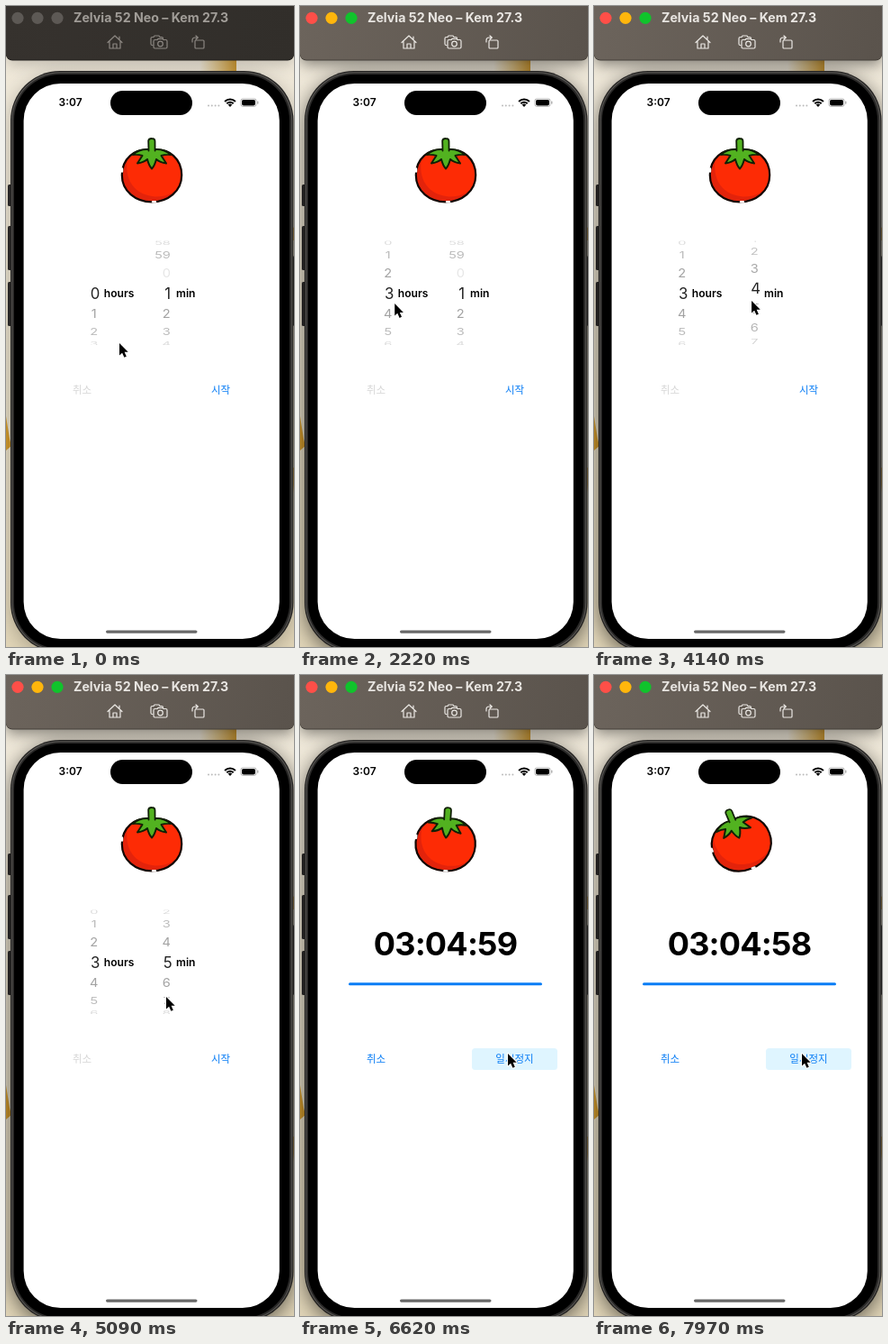
Write an HTML page with a canvas that moves like this. It is 320 px wide and 711 px high and loops after 7990 ms.

```html
<!DOCTYPE html>
<html lang="ko">
<head>
<meta charset="utf-8">
<title>Timer</title>
<style>
  html, body { margin: 0; width: 100%; height: 100%; overflow: hidden; background: #ddd5c4; }
  canvas { display: block; width: 320px; height: 711px; }
</style>
</head>
<body>
<canvas></canvas>
<script>
const LOOP = 7990, ACTIVATE = 920, START = 6110, TIMER_SHOWN = 6170, TICK = 7130;
const BLUE = '#0a7df5';
const LATIN = 'Inter, sans-serif', KOREAN = '"Noto Sans CJK KR", "Noto Sans CJK", sans-serif';

const canvas = document.querySelector('canvas');
const ctx = canvas.getContext('2d');
const ratio = window.devicePixelRatio || 1;
canvas.width = 320 * ratio;
canvas.height = 711 * ratio;

const clamp = v => Math.max(0, Math.min(1, v));
const progress = (t, from, to) => clamp((t - from) / (to - from));
const easeOut = p => 1 - (1 - p) ** 3;
const smooth = p => p * p * (3 - 2 * p);

// Value at time t of a list of [time, value] keys, eased between keys.
function track(t, keys) {
  let value = keys[0][1];
  for (let i = 1; i < keys.length; i++) {
    const [t0, v0] = keys[i - 1], [t1, v1] = keys[i];
    if (t >= t0) value = v0 + (v1 - v0) * smooth(progress(t, t0, t1));
  }
  return value;
}

function box(x, y, w, h, radius, fill) {
  ctx.beginPath();
  ctx.roundRect(x, y, w, h, radius);
  ctx.fillStyle = fill;
  ctx.fill();
}

function shadowed(blur, opacity, draw) {
  ctx.save();
  ctx.shadowColor = `rgba(0,0,0,${opacity})`;
  ctx.shadowBlur = blur * ratio;
  ctx.shadowOffsetY = 5 * ratio;
  draw();
  ctx.restore();
}

function disc(x, y, r, fill) {
  ctx.beginPath();
  ctx.arc(x, y, r, 0, Math.PI * 2);
  ctx.fillStyle = fill;
  ctx.fill();
}

function shape(d, fill, stroke, width) {
  const path = new Path2D(d);
  if (fill) { ctx.fillStyle = fill; ctx.fill(path); }
  if (stroke) { ctx.strokeStyle = stroke; ctx.lineWidth = width; ctx.stroke(path); }
}

function text(str, x, centerY, size, color, { weight = 400, align = 'left', family = LATIN } = {}) {
  ctx.font = `${weight} ${size}px ${family}`;
  ctx.textAlign = align;
  ctx.fillStyle = color;
  ctx.fillText(str, x, centerY + size * 0.36);
}

function clipped(x, y, w, h, draw) {
  ctx.save();
  ctx.beginPath();
  ctx.rect(x, y, w, h);
  ctx.clip();
  draw();
  ctx.restore();
}

function drawDesktop() {
  const wall = ctx.createLinearGradient(0, 60, 0, 711);
  wall.addColorStop(0, '#f1eadb');
  wall.addColorStop(0.5, '#e6dec9');
  wall.addColorStop(1, '#e2d6b8');
  ctx.fillStyle = wall;
  ctx.fillRect(0, 0, 320, 711);
  const gold = ctx.createLinearGradient(215, 0, 256, 0);
  gold.addColorStop(0, 'rgba(214,170,70,0)');
  gold.addColorStop(1, '#c9952f');
  ctx.fillStyle = gold;
  ctx.fillRect(215, 60, 41, 13);
  shape('M0 455L4 480L6 488L0 493Z', '#d29a2c');
  shape('M317 244L320 246V260H317ZM317 512H320V540Z', '#dcae58');
}

function drawToolbar(active) {
  const bar = ctx.createLinearGradient(0, 0, 320, 60);
  bar.addColorStop(0, active ? '#6c645c' : '#36322e');
  bar.addColorStop(1, active ? '#5a534c' : '#312e2a');
  box(0, -10, 320, 70.5, 7, active ? '#45403a' : '#211f1c');
  box(0, -10, 320, 69.5, 7, bar);
  const lights = active ? ['#ff4f48', '#ffb60c', '#10c32c'] : ['#5d5955', '#5d5955', '#5d5955'];
  lights.forEach((color, i) => disc(13 + 22 * i, 13.3, 6.6, color));
  text('Zelvia 52 Neo – Kem 27.3', 75, 13, 14.2, active ? '#e9e6e2' : '#a19d98', { weight: 700 });

  const ink = active ? '#ebe8e4' : '#8c8782';
  ctx.lineJoin = ctx.lineCap = 'round';
  shape('M113 40.500L121 33L129 40.500M115 39.500V47H127V39.500M119 47V42H123V47M126 34V36.500', null, ink, 1.2);
  shape('M163 43.500H162.500Q161 43.500 161 42V36Q161 34.500 162.500 34.500H164L165 33H170L171 34.500H173Q174.500 34.500 174.500 36', null, ink, 1.2);
  shape('M165.500 37.500H168L169 36.300H174L175 37.500H177.500Q179 37.500 179 39V45.500Q179 47 177.500 47H165.500Q164 47 164 45.500V39Q164 37.500 165.500 37.500ZM174.300 42A2.800 2.800 0 1 1 168.700 42A2.800 2.800 0 1 1 174.300 42Z', null, ink, 1.2);
  shape('M211 38H219Q220 38 220 39V46Q220 47 219 47H211Q210 47 210 46V39Q210 38 211 38ZM207 40V38Q207 35 210 35H213M211 33L213.300 35L211 37', null, ink, 1.2);
}

function drawPhone(active) {
  for (const [y, h] of [[198, 24], [244, 49], [306, 49]]) box(2, y, 6, h, 1.5, '#2d2b2a');
  box(315, 277, 5, 78, 1.5, '#2d2b2a');
  shadowed(22, active ? 0.55 : 0.25, () => box(5, 72, 314.5, 645, 55, '#232221'));
  box(6.2, 73.2, 312, 642.5, 54, '#5b5956');
  box(7.2, 74.2, 310, 640.5, 53, '#2b2a29');
  box(9, 76, 306, 637, 51, '#000');
  box(19.6, 86, 284.2, 616, 41, '#fff');
  box(116, 94, 91, 27, 13.5, '#000');
  box(111, 692.5, 101.5, 3.2, 1.6, '#686868');

  text('3:07', 58.5, 107, 12, '#000', { weight: 600 });
  for (let i = 0; i < 4; i++) disc(225 + 3.8 * i, 110.5, 1, '#bbb');
  ctx.lineCap = 'butt';
  for (const r of [9.4, 6.2]) {
    ctx.beginPath();
    ctx.arc(249, 112, r - 1, -Math.PI * 0.75, -Math.PI * 0.25);
    ctx.strokeStyle = '#000';
    ctx.lineWidth = 2;
    ctx.stroke();
  }
  shape('M249 112L246.700 109.400Q249 107.400 251.300 109.400Z', '#000');
  box(260.5, 102.6, 18, 9.2, 3, '#aaa');
  box(261.2, 103.3, 16.6, 7.8, 2.4, '#fff');
  box(262, 104, 15, 6.4, 1.8, '#000');
  box(279.2, 105.6, 1.2, 3.2, 0.6, '#aaa');
}

function drawTomato(angle) {
  const body = 'M0-22.500C-20-26-33.200-12-33.200 5C-33.200 23-18 34.800 0 34.800C18 34.800 33.200 23 33.200 5C33.200-12 20-26 0-22.500Z';
  const stem = 'M-3.500-22L-3.800-33Q-3.300-35.600 0-35.500Q3.500-35.500 3.500-32.500L3.600-22';
  ctx.save();
  ctx.translate(162, 182.5);
  ctx.rotate(angle * Math.PI / 180);
  ctx.lineJoin = ctx.lineCap = 'round';
  shape(body, '#e3230b');
  ctx.save();
  ctx.clip(new Path2D(body));
  shape('M-27-14C-31 10-20 27 4 29C20 29 30 22 35 10V-30H-25Z', '#fd2b05');
  ctx.restore();
  shape(body, null, '#120805', 2.2);
  shape('M-33-2L-33 1M1 34.800H4', null, '#fff', 2.4);
  shape('M-4-23.500Q-14-24-21-17.500Q-15-18-10.500-16.500L-16-8Q-9-9-5-12.500Q-3-5 0-2Q3-5 5-12.500Q9-9 16-8L10.500-16.500Q15-18 21-17.500Q14-24 4-23.500Z', '#52b220', '#102006', 2);
  shape(stem, '#52b220');
  shape(stem, null, '#102006', 1.8);
  ctx.restore();
}

// A wheel of numbers on a cylinder; the centre band is magnified and dark.
function drawWheel(right, scroll, count, wraps, dimZero) {
  const CENTER = 318.5, RADIUS = 63, STEP = 21 * Math.PI / 180, HALF_BAND = 11.7;

  // Each digit is centred in a cell of equal width.
  function drawNumber(value, size, color) {
    const cell = size * 0.6;
    [...String(value)].reverse().forEach((digit, i) =>
      text(digit, -cell * (i + 0.5), 0, size, color, { align: 'center' }));
  }

  function rows(selected) {
    const first = Math.round(scroll) - 4;
    for (let row = first; row <= first + 8; row++) {
      if (!wraps && (row < 0 || row >= count)) continue;
      const theta = (row - scroll) * STEP;
      if (Math.abs(theta) > 1.5) continue;
      const value = (row + count) % count;
      const depth = Math.cos(theta);
      const opacity = dimZero && value === 0 ? 0.11 : 0.45 * depth ** 1.3;
      ctx.save();
      ctx.translate(right - (selected ? 0 : 2), CENTER + RADIUS * Math.sin(theta));
      ctx.scale(1, depth);
      drawNumber(value, selected ? 16.8 : 14.6, selected ? '#222' : `rgba(30,30,30,${opacity})`);
      ctx.restore();
    }
  }

  const left = right - 30, top = CENTER - HALF_BAND, bottom = CENTER + HALF_BAND;
  clipped(left, 260.5, 40, top - 260.5, () => rows(false));
  clipped(left, top, 40, HALF_BAND * 2, () => rows(true));
  clipped(left, bottom, 40, 376 - bottom, () => rows(false));
}

function drawPicker(t) {
  const hours = 3 * easeOut(progress(t, 1180, 2200));
  const minutes = 1 + 2 * easeOut(progress(t, 3160, 3750)) + 2 * easeOut(progress(t, 3930, 4700));
  drawWheel(104.2, hours, 24, false, false);
  drawWheel(184.7, minutes, 60, true, true);
  text('hours', 108.8, 319, 12.1, '#000', { weight: 600 });
  text('min', 189, 319, 12.1, '#000', { weight: 600 });
}

function drawCountdown(t) {
  ctx.letterSpacing = '-0.8px';
  text(t < TICK ? '03:04:59' : '03:04:58', 161.5, 298.5, 36, '#000', { weight: 700, align: 'center' });
  ctx.letterSpacing = '0px';
  box(54, 341.2, 215, 3, 1.5, BLUE);
}

function drawButtons(t) {
  const started = t >= START;
  const label = { align: 'center', family: KOREAN, weight: started ? 500 : 400 };
  if (started) box(191, 414, 95, 24, 3.5, '#dff5ff');
  ctx.globalAlpha = started ? 0.7 + 0.3 * progress(t, START, START + 120) : 1;
  text('취소', 84.5, 426, 11.5, started ? BLUE : '#d6d6d6', label);
  text(started ? '일시정지' : '시작', 238.5, 426, 11.5, BLUE, label);
  ctx.globalAlpha = 1;
}

function drawCursor(t) {
  const x = track(t, [[100, 126], [800, 105], [2200, 105], [2850, 174], [3750, 174], [4900, 178], [5150, 178], [5850, 231]]);
  const y = track(t, [[100, 374], [800, 360], [1180, 360], [1340, 330], [2200, 330], [2850, 355],
    [3160, 355], [3320, 325], [3750, 325], [3900, 357], [3930, 357], [4080, 327], [4600, 327],
    [4900, 357], [5150, 357], [5850, 420]]);
  ctx.save();
  ctx.translate(x, y);
  ctx.lineJoin = 'round';
  const arrow = 'M0 0V13.500L3.100 10.700L5.400 15.800L7.800 14.700L5.600 9.800H9.700Z';
  shape(arrow, null, '#fff', 2);
  shape(arrow, '#000');
  ctx.restore();
}

function draw(t) {
  const active = t >= ACTIVATE;
  ctx.setTransform(ratio, 0, 0, ratio, 0, 0);
  drawDesktop();
  shadowed(16, active ? 0.45 : 0.2, () => box(0, -10, 320, 70, 7, '#45403a'));
  drawPhone(active);
  drawToolbar(active);
  drawTomato(t < 6150 ? 0 : 24 * Math.sin((t - 6150) / 1000 * Math.PI * 2));
  if (t < TIMER_SHOWN) drawPicker(t);
  else drawCountdown(t);
  drawButtons(t);
  drawCursor(t);
}

const begin = performance.now();
function frame() {
  draw((performance.now() - begin) % LOOP);
  requestAnimationFrame(frame);
}
frame();
</script>
</body>
</html>
```
